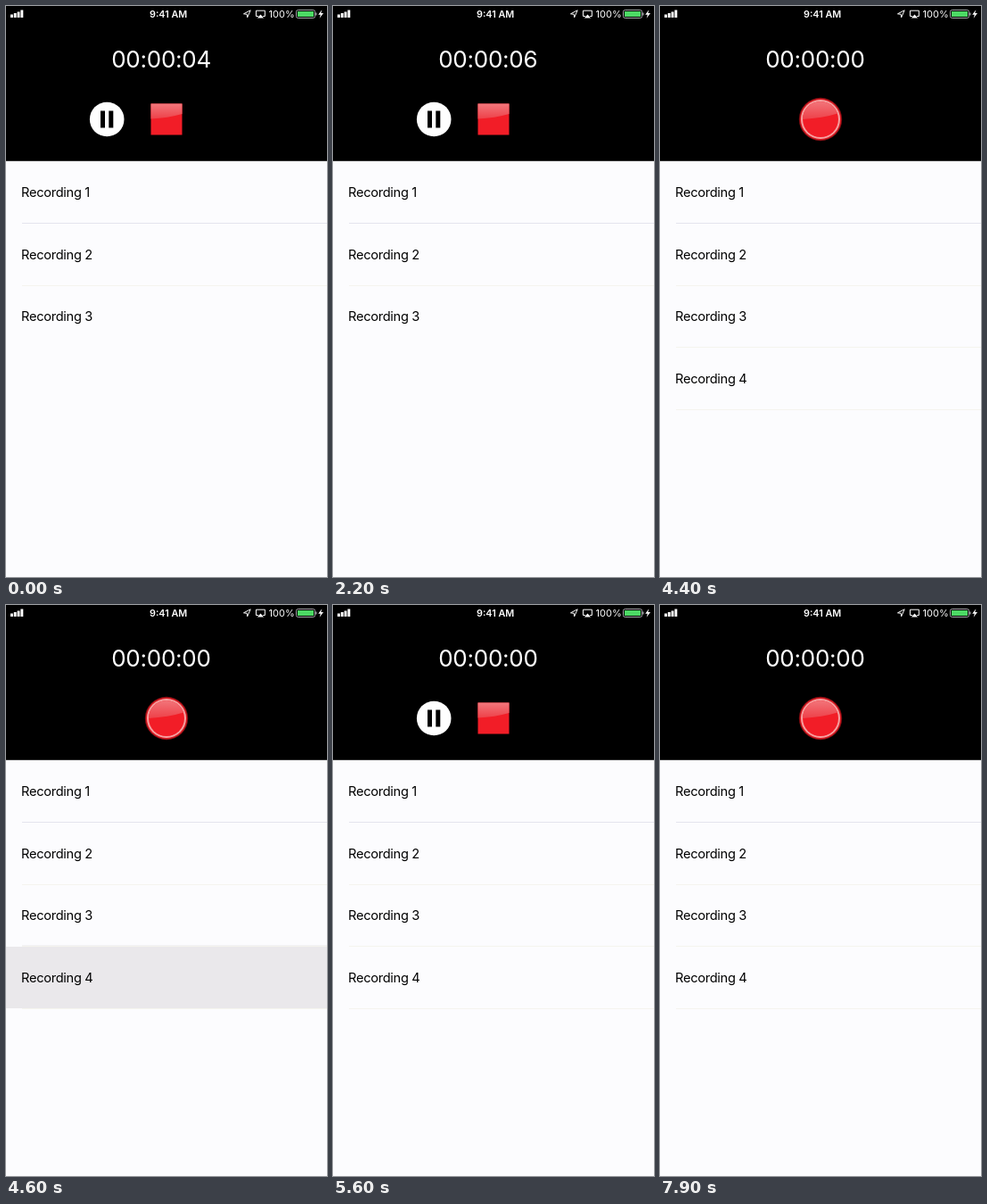
These frames come from a looping animation (360 by 640 pixels, 8 s). An HTML page with a canvas:

```html
<!DOCTYPE html>
<html lang="en">
<head>
<meta charset="utf-8">
<title>Voice recorder</title>
<style>
  html, body { margin: 0; width: 100%; height: 100%; overflow: hidden; background: #fcfcfe; }
  canvas { display: block; width: 360px; height: 640px; }
</style>
</head>
<body>
<canvas id="stage" width="360" height="640"></canvas>
<script>
const ctx = document.getElementById('stage').getContext('2d');
const LOOP = 8000;
const WHITE = '#fefefe';
const RED = '#f21d27';
const HIGHLIGHT = '#eae8eb';
const FONT = 'Inter, Roboto, sans-serif';

// Moments of the session, in ms
const SAVED = 3600, ROW_TAP = 4600, PLAY = 4700, PLAY_END = 7400;
const PRESS_TIME = 200;
const FADE_START = 4900, FADE_END = 5300;

function rect(x, y, w, h, color) {
  ctx.fillStyle = color;
  ctx.fillRect(x, y, w, h);
}

function text(str, x, y, font, color, spacing = 0) {
  ctx.font = `${font} ${FONT}`;
  ctx.letterSpacing = spacing + 'px';
  ctx.fillStyle = color;
  ctx.fillText(str, x, y);
}

function poly(points, closed = true) {
  ctx.beginPath();
  points.forEach(([x, y]) => ctx.lineTo(x, y));
  if (closed) ctx.closePath();
}

function circle(x, y, r, color) {
  ctx.beginPath();
  ctx.arc(x, y, r, 0, Math.PI * 2);
  ctx.fillStyle = color;
  ctx.fill();
}

function gradient(y0, y1, from, to) {
  const g = ctx.createLinearGradient(0, y0, 0, y1);
  g.addColorStop(0, from);
  g.addColorStop(1, to);
  return g;
}

// Light upper part with a curved lower edge
function gloss(x, y, w, left, right) {
  ctx.beginPath();
  ctx.moveTo(x, y);
  ctx.lineTo(x + w, y);
  ctx.lineTo(x + w, right);
  ctx.quadraticCurveTo(x + w * 0.55, left - 1, x, left);
  ctx.closePath();
  ctx.fillStyle = gradient(y, left, '#f2777c', '#ee4149');
  ctx.fill();
}

function statusBar() {
  [3.5, 5, 6.5, 8.5].forEach((h, i) => rect(5 + i * 3.8, 13 - h, 2.9, h, WHITE));
  text('9:41 AM', 161, 13, '600 10.8px', WHITE);

  ctx.strokeStyle = WHITE;
  ctx.lineWidth = 1;
  poly([[274.2, 4.8], [266.5, 8.8], [270.2, 9.3], [270.7, 12.8]]);
  ctx.stroke();

  poly([[283, 11.5], [280.5, 11.5], [280.5, 5.2], [290.4, 5.2], [290.4, 11.5], [288.2, 11.5]], false);
  ctx.stroke();
  poly([[285.5, 9.5], [289.1, 13.6], [281.9, 13.6]]);
  ctx.fillStyle = WHITE;
  ctx.fill();

  text('100%', 294.6, 13, '400 11px', WHITE);

  ctx.strokeStyle = '#a4a4a8';
  ctx.beginPath();
  ctx.roundRect(325.5, 4.5, 21, 9, 2);
  ctx.stroke();
  rect(327, 6, 18, 6, '#4cd964');
  rect(347.3, 7.5, 1.3, 3, '#a4a4a8');
  poly([[354.3, 4.2], [350.2, 9.7], [352.8, 9.7], [351.6, 13.8], [356, 7.9], [353.3, 7.9]]);
  ctx.fillStyle = WHITE;
  ctx.fill();
}

function pauseButton() {
  circle(113.2, 127, 19.3, WHITE);
  rect(106, 117.5, 5, 19, '#000');
  rect(115.3, 117.5, 5, 19, '#000');
}

function stopButton(pressed) {
  rect(162.5, 109.5, 35, 35, RED);
  gloss(162.5, 109.5, 35, 126.5, 121);
  if (pressed) rect(162.5, 109.5, 35, 35, 'rgba(0,0,0,0.42)');
}

function recordButton() {
  circle(180, 127, 24.2, '#7c0d12');
  circle(180, 127, 23.2, '#d81a22');
  circle(180, 127, 22, '#f6a0a0');
  circle(180, 127, 20, RED);
  ctx.save();
  ctx.beginPath();
  ctx.arc(180, 127, 20, 0, Math.PI * 2);
  ctx.clip();
  gloss(159, 106, 42, 127, 120);
  ctx.restore();
}

function rows(t) {
  const count = t < SAVED ? 3 : 4;
  if (t >= ROW_TAP && t < FADE_END) {
    ctx.globalAlpha = Math.min(1, (FADE_END - t) / (FADE_END - FADE_START));
    rect(0, 383, 360, 69, HIGHLIGHT);
    rect(18, 381.5, 342, 1.5, HIGHLIGHT);
    ctx.globalAlpha = 1;
  }
  for (let i = 0; i < count; i++) {
    const y = 214 + i * 69.6;
    text('Recording ' + (i + 1), 17, Math.round(y), '400 14.6px', '#000', -0.28);
    if (count === 4 || i < 2) {
      const line = Math.round(243 + i * 69.6);
      rect(18, line, 342, 1, i ? '#f5f4ee' : '#e4e4ee');
    }
  }
}

function seconds(t) {
  if (t < SAVED) return 4 + Math.floor((t + 200) / 1000);
  if (t >= PLAY && t < PLAY_END) return Math.max(0, Math.floor((t - PLAY - 1) / 1000));
  return 0;
}

function draw(t) {
  rect(0, 0, 360, 640, '#fcfcfe');
  rect(0, 0, 360, 173.8, '#000');
  statusBar();
  text('00:00:0' + seconds(t), 118.2, 69, '400 26px', WHITE, -0.25);

  const recording = t < SAVED;
  const playing = t >= PLAY && t < PLAY_END;
  if (recording || playing) {
    const end = recording ? SAVED : PLAY_END;
    pauseButton();
    stopButton(t >= end - PRESS_TIME);
  } else {
    recordButton();
  }
  rows(t);
}

const start = performance.now();
function tick() {
  const t = (performance.now() - start) % LOOP;
  draw(Math.floor(t / 100) * 100);
  requestAnimationFrame(tick);
}
tick();
</script>
</body>
</html>
```
